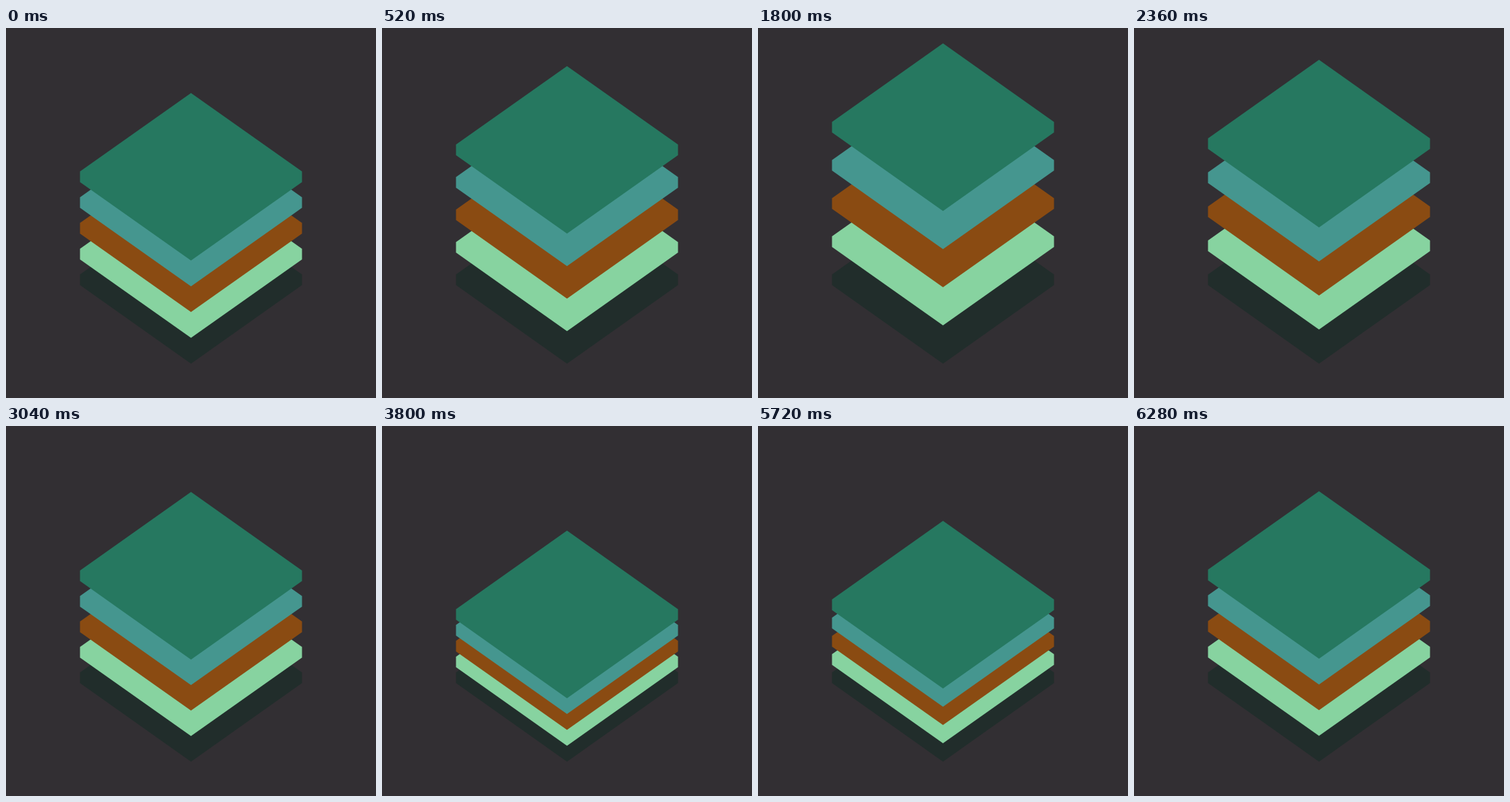
An HTML page that plays this animation: 512x512 px, repeating every 6320 ms.

```html
<!DOCTYPE html>
<html>
<head>
<meta charset="utf-8">
<style>
  html, body { margin: 0; height: 100%; overflow: hidden; background: #322f33; }
  svg { display: block; width: 100%; height: 100%; }
</style>
</head>
<body>
<svg viewBox="0 0 512 512"></svg>
<script>
const LOOP = 6320, STEP = 40;
// Bottom to top; the first one is the resting shadow.
const colors = ['#212d2b', '#87d3a0', '#8a4b12', '#45968f', '#267860'];
const yTop = 232.5, yBottom = 464.4, xLeft = 102.4, xRight = 409.6;
const drop = (xRight - xLeft) / 2 * Math.SQRT1_2;
const outline = [
  [256, yTop], [xRight, yTop + drop], [xRight, yBottom - drop],
  [256, yBottom], [xLeft, yBottom - drop], [xLeft, yTop + drop]
].join(' ');

const layers = colors.map(color => {
  const tile = document.createElementNS('http://www.w3.org/2000/svg', 'polygon');
  tile.setAttribute('points', outline);
  tile.setAttribute('fill', color);
  return document.querySelector('svg').appendChild(tile);
});

function draw(elapsed) {
  const t = Math.floor(elapsed % LOOP / STEP) * STEP;
  const gap = 34.5 + 19.1 * Math.sin(t / 1000 + 0.06);
  layers.forEach((tile, i) => tile.setAttribute('transform', `translate(0 ${-i * gap})`));
}

const startTime = performance.now();
function tick() {
  draw(performance.now() - startTime);
  requestAnimationFrame(tick);
}
tick();
</script>
</body>
</html>
```
